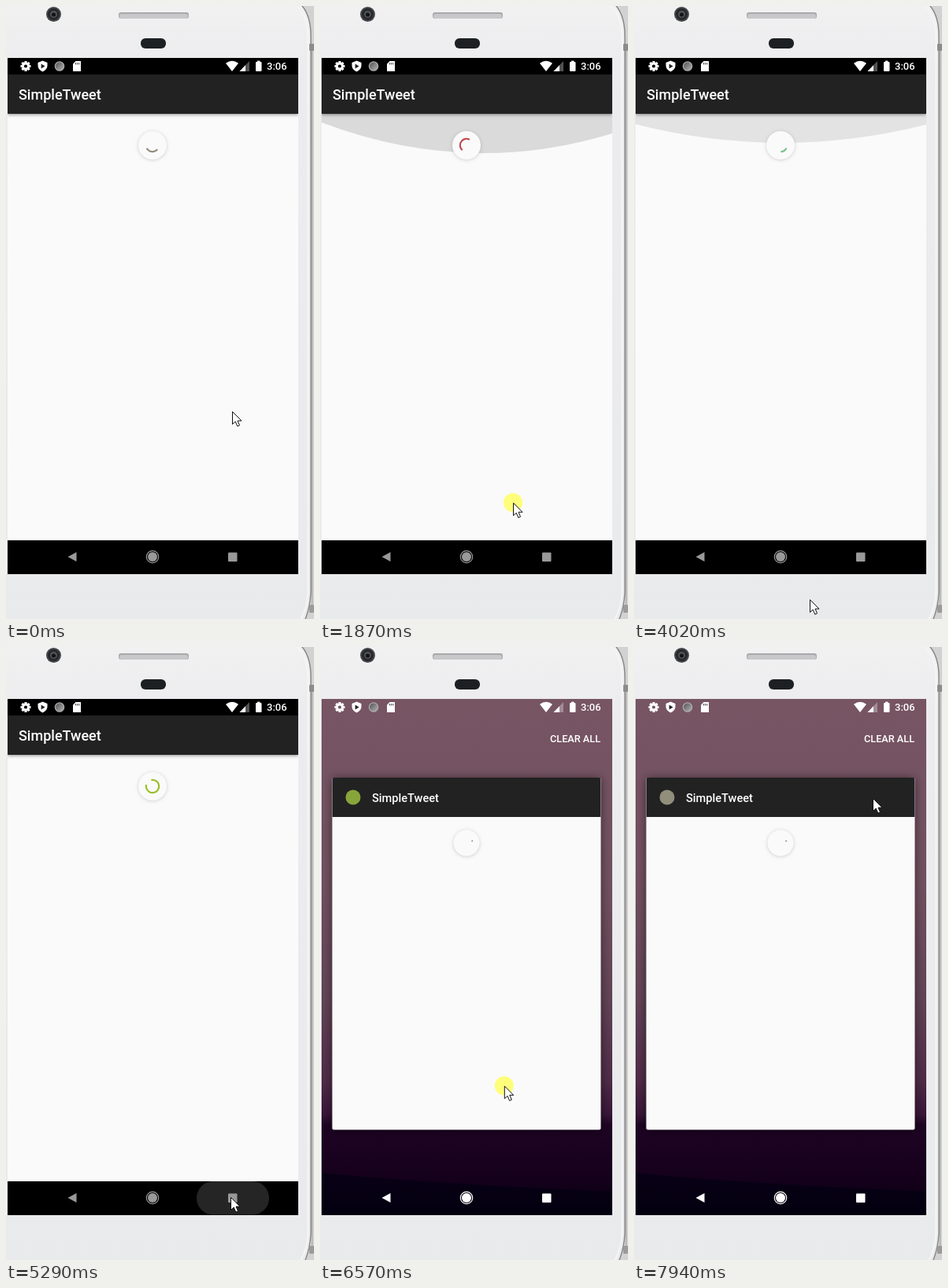
An HTML page with a canvas that plays this animation: 391 px wide and 779 px high, repeating every 8 s.

```html
<!DOCTYPE html>
<html lang="en">
<head>
<meta charset="utf-8">
<title>Pull to refresh</title>
<style>
html, body { margin: 0; width: 100%; height: 100%; overflow: hidden; background: #ececee; }
canvas { display: block; width: 391px; height: 779px; }
</style>
</head>
<body>
<canvas id="stage"></canvas>
<script>
const LOOP = 8000, RECENTS = 5430;
const canvas = document.getElementById('stage');
const ctx = canvas.getContext('2d');
const dpr = window.devicePixelRatio || 1;
canvas.width = 391 * dpr;
canvas.height = 779 * dpr;

// Pointer gestures; between them the pointer glides to the next one
const drag = (start, end, from, to) => ({ start, end, from, to, press: true });
const rest = (start, end, from, to = from) => ({ start, end, from, to });
const gestures = [
  rest(0, 120, [287, 515]),
  drag(450, 950, [258, 260], [250, 590]),
  drag(1370, 1900, [245, 300], [245, 634]),
  drag(2600, 3040, [190, 600], [190, 209]),
  drag(3350, 3850, [190, 180], [213, 640]),
  rest(4020, 4020, [223, 754]),
  rest(4900, 5930, [285, 699]),
  drag(6300, 6800, [240, 625], [229, 505]),
  rest(7300, 7300, [270, 56]),
  rest(7690, 7940, [302, 169], [303, 192])
];
// Spinner cycles at a few moments; it slows before the app is left, then freezes
const cycles = [[0, .795], [1870, 2.267], [3000, 3.03], [4020, 3.86], [5290, 4.49], [5700, 5.02]];
const spinColors = [[133, 133, 133], [216, 173, 88], [191, 74, 78], [100, 195, 225], [154, 191, 44]];

const mix = (a, b, p) => a + (b - a) * p;
const mixAll = (a, b, p) => a.map((v, i) => mix(v, b[i], p));
const clamp = v => Math.min(1, Math.max(0, v));
const ease = v => { const p = clamp(v); return p * p * (3 - 2 * p); };

function cycleAt(t) {
  const i = cycles.findIndex(c => c[0] > t);
  if (i < 0) return cycles[cycles.length - 1][1];
  const [[t0, a], [t1, b]] = cycles.slice(i - 1, i + 1);
  return mix(a, b, (t - t0) / (t1 - t0));
}

function pointerAt(t) {
  const i = gestures.findLastIndex(g => g.start <= t), g = gestures[i], next = gestures[i + 1];
  if (t < g.end) return mixAll(g.from, g.to, ease((t - g.start) / (g.end - g.start)));
  return next ? mixAll(g.to, next.from, ease((t - g.end) / (next.start - g.end))) : g.to;
}

function rect(x, y, w, h, fill, r = 0) {
  ctx.beginPath();
  ctx.roundRect(x, y, w, h, r);
  ctx.fillStyle = fill;
  ctx.fill();
}
function disc(x, y, r, fill) {
  ctx.beginPath();
  ctx.arc(x, y, r, 0, 7);
  ctx.fillStyle = fill;
  ctx.fill();
}
function ring(x, y, r, stroke, width, from = 0, to = 7) {
  ctx.beginPath();
  ctx.arc(x, y, r, from, to);
  ctx.strokeStyle = stroke;
  ctx.lineWidth = width;
  ctx.stroke();
}
function path(d, fill, stroke, width = 1) {
  const p = new Path2D(d);
  if (fill) { ctx.fillStyle = fill; ctx.fill(p); }
  if (stroke) { ctx.strokeStyle = stroke; ctx.lineWidth = width; ctx.stroke(p); }
}
function text(s, x, y, size) {
  ctx.font = `500 ${size}px Roboto, sans-serif`;
  ctx.fillStyle = '#fff';
  ctx.fillText(s, x, y);
}
function gradient(x0, y0, x1, y1, ...stops) {
  const g = ctx.createLinearGradient(x0, y0, x1, y1);
  stops.forEach(([o, c]) => g.addColorStop(o, c));
  return g;
}
function withShadow(color, blur, dy, draw) {
  ctx.save();
  ctx.shadowColor = color;
  ctx.shadowBlur = blur * dpr;
  ctx.shadowOffsetY = dy * dpr;
  draw();
  ctx.restore();
}

function phone() {
  rect(0, 0, 391, 779, '#d2d2d2');
  path('M-5 -5H371Q387 8 387 38V745Q386 766 378 784H-5Z',
    gradient(0, 0, 0, 779, [0, '#f1f1f2'], [.1, '#ececee'], [1, '#e9eaec']), '#858585', 1.4);
  path('M367 -2Q383 10 383.5 40V744Q383 764 374 780', null, '#f5f5f5', 2);
  rect(385, 48, 6, 9, '#8d8b8b', 1);
  rect(388, 57, 1.2, 704, '#aaa7a7');
  rect(385, 761, 6, 10, '#9c9a9a', 1);

  disc(60.5, 10.5, 9.5, '#45464a');
  disc(60.5, 10.5, 7.5, '#27282b');
  disc(60.5, 10.5, 4.5, '#505256');
  disc(60.5, 11, 2.5, '#111215');
  rect(143, 8, 89, 8, '#a9a9ab', 3);
  rect(144, 10, 87, 6, '#c8c8ca', 3);
  rect(171, 41, 32, 13, '#1d2023', 6);
}

function wallpaper() {
  rect(2, 66, 369, 656, gradient(0, 66, 0, 722, [0, '#775563'], [.36, '#71505f'], [.58, '#624456'],
    [.74, '#4f2b47'], [.805, '#381638'], [.825, '#1e0424'], [.93, '#15001b'], [1, '#06000f']));
  path('M2 668Q110 680 371 692V722H2Z', 'rgba(0,0,18,.6)');
}

function statusBar() {
  ctx.save();
  ctx.translate(25, 76.5);
  for (let i = 0; i < 8; i++) {
    rect(-1.6, -6.5, 3.2, 4, '#fff', .6);
    ctx.rotate(Math.PI / 4);
  }
  ring(0, 0, 3.5, '#fff', 2.8);
  ctx.restore();

  path('M46.5 69.5L52.5 72V76Q52.3 81 46.5 83.5Q40.7 81 40.5 76V72Z', '#fff');
  path('M44.6 73.5L49.6 76.5L44.6 79.5Z', '#222');
  disc(68, 76.5, 6.3, '#aaa');
  disc(68, 76.5, 5, gradient(63, 72, 72, 81, [0, '#555'], [1, '#aaa']));
  path('M88.5 70H95V83H85V73.5Z', '#fff');
  path('M88.6 72V74.5M90.7 72V74.5M92.8 72V74.5', null, '#444');

  path('M279 72.8Q287 66.8 295 72.8L287 83Z', '#fff');
  path('M309 70V83H296.5Z', 'rgba(255,255,255,.32)');
  path('M304 75.2V83H296.5Z', '#fff');
  rect(317, 71, 7.5, 12, '#fff', 1);
  rect(319, 69.6, 3.5, 2, '#fff');
  text('3:06', 331, 81, 13);
}

function navBar(color) {
  path('M78.5 700L89.5 694V706Z', color);
  disc(186, 700, 6, color);
  ring(186, 700, 7.7, color, 1.2);
  rect(282, 694.5, 11.5, 11.5, color, 1);
}

// The overscroll arc swells while dragging and fades after release
function glow(t, { start, end, from, to }) {
  const pull = clamp((Math.min(t, end) - start) / 500);
  const g = clamp(pull - Math.max(0, t - end) / 650);
  if (!g) return;
  const down = to[1] > from[1], edge = down ? 137 : 679;
  const tip = edge + (down ? 100 : -100) * g;
  const mid = mix(186, from[0], .35), half = 232;
  path(`M${mid - half} ${edge}Q${mid} ${tip} ${mid + half} ${edge}Z`, `rgba(0,0,0,${.13 * g})`);
}

function spinner(t, x, y, scale) {
  const c = cycleAt(t), n = Math.floor(c), f = c - n;
  const head = ease(2 * f), tail = ease(2 * f - 1);
  const start = 284 * c - 369 + 288 * (n + tail);
  const sweep = 288 * (head - tail) + 8;
  const rgb = mixAll(spinColors[n % 5], spinColors[(n + 1) % 5], clamp(4 * f - 3));
  const rad = Math.PI / 180;
  ctx.save();
  ctx.translate(x, y);
  ctx.scale(scale, scale);
  withShadow('rgba(0,0,0,.18)', 4, .7, () => disc(0, 0, 18, '#fafafa'));
  ring(0, 0, 8.2, `rgb(${rgb})`, 2.2, start * rad, (start + sweep) * rad);
  ctx.restore();
}

// p runs from full screen (0) to recents card (1)
function app(t, p) {
  const x = mix(2, 15.5, p), y = mix(87, 166, p), w = mix(369, 341, p);
  const h = mix(679, 613.5, p) - y, r = 2 * p;
  withShadow('rgba(0,0,0,.5)', 12 * p, p, () => rect(x, y, w, h, '#fafafa', r));
  ctx.save();
  ctx.beginPath();
  ctx.roundRect(x, y, w, h, r);
  ctx.clip();
  if (!p) gestures.filter(g => g.press).forEach(g => glow(t, g));
  spinner(t, 186, mix(177, 249, p), w / 369);
  withShadow(`rgba(0,0,0,${.45 * (1 - p)})`, 4, 1, () => rect(x, y, w, 50, '#222'));
  ctx.globalAlpha = p;
  disc(42, y + 25, 9.5, t < 6960 ? '#88a53b' : '#918e7c');
  ctx.globalAlpha = 1;
  text('SimpleTweet', mix(16, 66, p), y + mix(32, 31, p), mix(18, 14.6, p));
  ctx.restore();
}

function cursor(t) {
  const [x, y] = pointerAt(t);
  if (gestures.some(g => g.press && t >= g.start && t < g.end)) disc(x, y, 12, 'rgba(255,255,95,.82)');
  ctx.save();
  ctx.translate(x + .5, y + .5);
  path('M0 0V16L3.7 12.6L6.3 18.6L9 17.4L6.5 11.6H11.5Z', '#fff', '#111');
  ctx.restore();
}

function draw(t) {
  ctx.setTransform(dpr, 0, 0, dpr, 0, 0);
  const p = ease((t - RECENTS) / 450);
  phone();

  ctx.save();
  ctx.beginPath();
  ctx.rect(2, 66, 369, 656);
  ctx.clip();
  rect(2, 66, 369, 656, '#000');
  ctx.globalAlpha = p;
  wallpaper();
  text('CLEAR ALL', 292, 121, 12.7);
  ctx.globalAlpha = 1;
  app(t, p);
  statusBar();
  const ripple = clamp((t - 4780) / 260) * (1 - p);
  rect(242, 679, 92, 42.5, `rgba(255,255,255,${.145 * ripple})`, 21);
  navBar(p ? '#fff' : '#999');
  ctx.restore();

  cursor(t);
}

const began = performance.now();
function tick() {
  draw(Math.max(0, performance.now() - began) % LOOP);
  requestAnimationFrame(tick);
}
tick();
</script>
</body>
</html>
```
